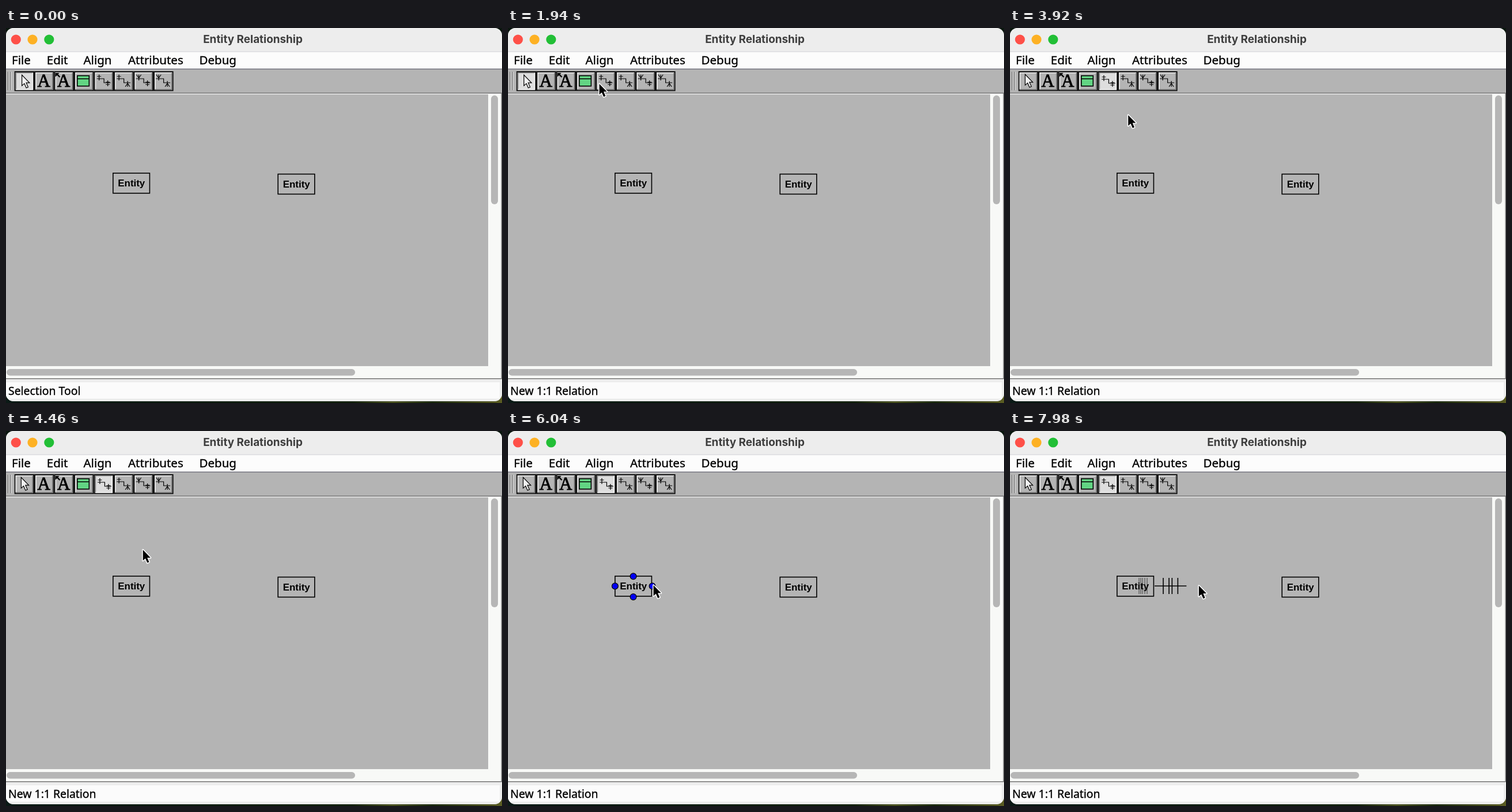
Write an HTML page that moves like this. It is 861 by 651 pixels and loops after 8 s.

```html
<!DOCTYPE html>
<html lang="en">
<head>
<meta charset="utf-8">
<title>Entity Relationship</title>
<style>
  html, body { margin: 0; width: 100%; height: 100%; overflow: hidden; background: #0b170f; }
  svg { display: block; width: 861px; height: 651px; }
  .ui { font-family: "Noto Sans", "Open Sans", sans-serif; fill: #000; stroke: #000; stroke-width: .35; }
  .title { font: 700 18.9px Inter, sans-serif; fill: #3e3e3e; text-anchor: middle; }
  .entity { font: 700 16.9px "Liberation Sans", sans-serif; text-anchor: middle; }
  .serif { font: 31px "Liberation Serif", serif; text-anchor: middle; stroke: #000; stroke-width: .9; }
  .line { fill: none; stroke: #000; stroke-width: 1.6; }
  .thin { fill: none; stroke: #000; stroke-width: 1.2; }
</style>
</head>
<body>
<svg viewBox="0 0 861 651">
  <defs>
    <linearGradient id="desk">
      <stop offset="0" stop-color="#0b1a16"/>
      <stop offset=".7" stop-color="#14220f"/>
      <stop offset=".78" stop-color="#4a5220"/>
      <stop offset=".86" stop-color="#1b2a10"/>
      <stop offset="1" stop-color="#5a5c22"/>
    </linearGradient>
    <clipPath id="frame"><rect width="861" height="648" rx="13"/></clipPath>
    <path id="arrow" d="M0 0V18.6L4.3 14.9L7.6 22.5L10.8 21.1L7.5 13.6H13.2Z"/>
  </defs>
  <rect y="630" width="861" height="21" fill="url(#desk)"/>
  <g clip-path="url(#frame)">
    <rect width="861" height="651" fill="#b4b4b4"/>
    <rect width="861" height="41" fill="#ededed"/>
    <rect y="40.5" width="861" height="1" fill="#d9d9e0"/>
    <rect y="41.5" width="861" height="29.5" fill="#fcfcfc"/>
    <rect y="70.5" width="861" height="1.5" fill="#73737f"/>
    <rect y="112.4" width="861" height="1.4" fill="#686868"/>
    <rect y="113.8" width="861" height="1.4" fill="#f4f4f4"/>
    <circle cx="17.3" cy="20" r="8.6" fill="#fe5048"/>
    <circle cx="46" cy="20" r="8.6" fill="#fdb124"/>
    <circle cx="74.8" cy="20" r="8.6" fill="#22bf36"/>
    <text class="title" x="428.5" y="26">Entity Relationship</text>
    <g class="ui" font-size="20.5" id="menu"></g>
    <path d="M3.5 76V108M7.5 76V108" stroke="#777" stroke-width="1.3"/>
    <path d="M5 76V108M9 76V108" stroke="#dcdcdc"/>
    <g id="tools"></g>

    <path d="M837 115H859V608H0V587H837Z" fill="#f8f9f7"/>
    <rect x="842" y="117" width="12" height="189" rx="6" fill="#b6b6b6"/>
    <rect x="1" y="592" width="605" height="11.5" rx="5.7" fill="#b6b6b6"/>
    <rect y="609" width="861" height="40" fill="#ededed"/>
    <rect y="615" width="857" height="28.5" fill="#fbfbfb"/>
    <rect x="859" y="114" width="2" height="495" fill="#f4f4f4"/>
    <path d="M860.3 113V608.7H0" fill="none" stroke="#747474" stroke-width="1.4"/>
    <text class="ui" id="status" x="4" y="637" font-size="19.4"></text>

    <g id="entities"></g>
    <g id="ports" fill="#0000f5" stroke="#000" stroke-width="1.2">
      <circle cx="217.5" cy="252.3" r="5.4"/><circle cx="217.5" cy="288" r="5.4"/>
      <circle cx="185.8" cy="269.3" r="5.4"/><circle cx="250.5" cy="269.3" r="5.4"/>
    </g>
    <path id="trail" fill="none" stroke="#222" stroke-width=".8"/>
    <path id="link" class="line"/>
  </g>
  <g id="cursor">
    <use href="#arrow" fill="#fff" stroke="#fff" stroke-width="3" stroke-linejoin="round"/>
    <use href="#arrow"/>
  </g>
</svg>
<script>
const $ = id => document.getElementById(id);
const LOOP = 8000, HOVER = 1850, CLICK = 2700, PORTS = 5020, DRAG = 7550;
const LAG = 65, START = 251, MID = 269;

$('menu').innerHTML = [['File', 10], ['Edit', 70.8], ['Align', 134.5], ['Attributes', 212], ['Debug', 335.5]]
  .map(([s, x]) => `<text x="${x}" y="63">${s}</text>`).join('');

$('entities').innerHTML = [[185.8, 252], [472.2, 253.6]].map(([x, y]) =>
  `<rect class="line" x="${x}" y="${y}" width="63.6" height="34.8"/>
   <text class="entity" x="${x + 32}" y="${y + 23}">Entity</text>`).join('');

// Relation icons: a stepped line with a "one" or "many" mark at each end.
const one = (x, y) => `M${x} ${y - 6}v10M${x - 3.5} ${y - 3}h7M${x - 3.5} ${y + 1}h7`;
const many = (x, y, d) =>
  `M${x} ${y - 5}v10M${x - 5} ${y - d * 2}h10M${x - 4} ${y + d * 5}l4 ${-d * 6}l4 ${d * 6}`;
const relation = (from, to) => x => `<path class="thin" d="M${x + 5} 88H${x + 17.5}V95H${x + 29}
  ${from ? many(x + 9, 86, -1) : one(x + 9, 87)}${to ? many(x + 24, 97, 1) : one(x + 24, 97)}"/>`;

const letter = x => `<text class="serif" x="${x + 16.5}" y="101.5">A</text>`;
const icons = [
  x => `<use href="#arrow" x="${x + 11.7}" y="80.5" fill="#f2f2f2" stroke="#000" stroke-width="1.2"/>`,
  letter,
  x => letter(x) + `<path d="M${x + 2} 78h7l-2.3 2.2 4 4.3-1.6 1.6-4.2-4.2L${x + 2} 85Z"/>`,
  x => `<rect class="line" x="${x + 5.7}" y="82.8" width="20.5" height="18" style="fill:#62d483"/>
        <path class="line" d="M${x + 5.7} 88.3h20.5"/>`,
  relation(0, 0), relation(0, 1), relation(1, 0), relation(1, 1)
];
$('tools').innerHTML = icons.map((icon, i) => {
  const x = 14.6 + i * 34.5;
  return `<rect class="face" x="${x + 1}" y="76" width="32.5" height="32.5" stroke="#111" stroke-width="2"/>
    <path class="light" d="M${x + 2.8} 106V77.8H${x + 32}" fill="none" stroke-width="1.6"/>
    <path class="dark" d="M${x + 3} 106.7H${x + 31.7}V78" fill="none" stroke-width="1.6"/>
    <g class="icon">${icon(x)}</g>`;
}).join('');
const parts = ['face', 'light', 'dark', 'icon'].map(c => [...document.getElementsByClassName(c)]);
const attrs = ['fill', 'stroke', 'stroke', 'transform'];
const raised = ['#b4b4b4', '#eee', '#777', ''];
const pressed = ['#dedede', '#8a8a8a', '#f4f4f4', 'translate(1.3 1)'];

const path = [
  [1300, 400, 656], [1900, 158, 96], [2050, 158, 96], [2550, 168, 88], [3400, 168, 88],
  [4400, 237, 205], [4550, 237.5, 206], [5200, 251, 251], [5400, 251, 251], [6100, 252, 267], [DRAG, 252, 267]
];
const dragX = t => 252 + 75 * Math.max(0, (t - DRAG) / 430) ** 2;

function pointer(t) {
  if (t >= DRAG) return [dragX(t), 267.5];
  const i = path.findIndex(k => t < k[0]);
  if (i < 1) return [-50, -50];
  const [t0, x0, y0] = path[i - 1], [t1, x1, y1] = path[i];
  const p = (t - t0) / (t1 - t0), e = p * p * (3 - 2 * p);
  return [x0 + (x1 - x0) * e, y0 + (y1 - y0) * e];
}

const tick = x => `M${x} ${MID - 14}v28`;

function draw(t) {
  const [x, y] = pointer(t);
  $('cursor').setAttribute('transform', `translate(${x + .5} ${y + 1})`);
  $('status').textContent = t < HOVER ? 'Selection Tool' : 'New 1:1 Relation';
  const active = t < CLICK ? 0 : 4;
  parts.forEach((els, k) => els.forEach((el, i) =>
    el.setAttribute(attrs[k], (i === active ? pressed : raised)[k])));
  $('ports').style.display = t >= PORTS && t < DRAG ? '' : 'none';

  // The rubber band trails the pointer and leaves its far ticks behind on the box.
  const dragging = t >= DRAG, end = Math.max(START, dragX(t - LAG));
  $('link').setAttribute('d', dragging
    ? `M${START} ${MID}H${end}` + [START + 15, START + 25, end - 25, end - 15].map(tick).join('') : '');
  $('trail').setAttribute('d', dragging
    ? [224, 227, 230, 234, 238].filter(v => v < end - 15).map(tick).join('') : '');
}

const begin = performance.now();
function loop() {
  draw((performance.now() - begin) % LOOP);
  requestAnimationFrame(loop);
}
loop();
</script>
</body>
</html>
```
